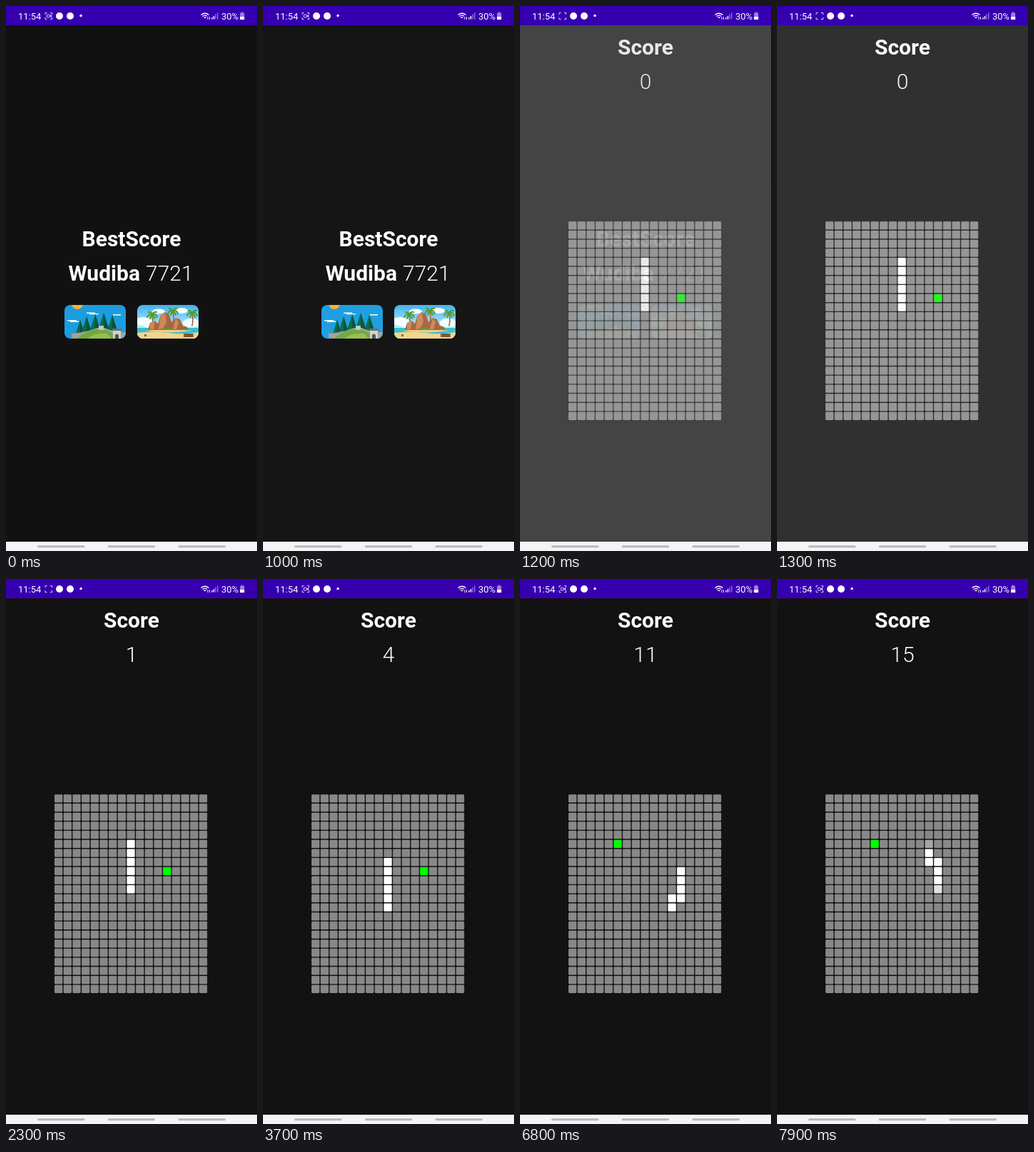
Write an HTML page that moves like this. It is 352 px wide and 762 px high and loops after 8 s.

```html
<!DOCTYPE html>
<html lang="en">
<head>
<meta charset="utf-8">
<title>Snake</title>
<style>
  html, body { margin: 0; width: 100%; height: 100%; overflow: hidden; background: #111; }
  svg { display: block; width: 100vw; height: 100vh; font-family: Roboto, sans-serif; fill: #fff; }
  .big { font-size: 30px; font-weight: 300; }
  .bold { font-weight: 700; }
  .mid { text-anchor: middle; }
  .small { font-size: 13px; }
</style>
</head>
<body>
<svg viewBox="0 0 352 762" preserveAspectRatio="none">
  <defs>
    <clipPath id="card"><rect width="86" height="47" rx="8"/></clipPath>
    <linearGradient id="sky" x2="0" y2="1">
      <stop offset="0" stop-color="#3fb2ee"/><stop offset=".7" stop-color="#c4eefa"/>
    </linearGradient>
    <g id="tree">
      <path d="M0 0L-8 25H8Z" fill="#0b6b4a"/>
      <path d="M0 0L8 25H0Z" fill="#07523c"/>
      <path d="M-1 25h2v3h-2z" fill="#6b4a2c"/>
    </g>
    <g id="palm" fill="none" stroke-linecap="round">
      <path d="M0 0Q2 8 0 17" stroke="#9a6a35" stroke-width="1.6"/>
      <path d="M-7 3Q-4-3 0 0Q4-4 7 3M-5-4Q-1-4 0 0Q2-5 6-4M-3 5Q-2 1 0 0Q3 1 4 5" stroke="#4f9a2c" stroke-width="2"/>
    </g>
  </defs>

  <rect width="352" height="762" fill="#111"/>

  <g id="home">
    <text class="big bold mid" x="176" y="335.5">BestScore</text>
    <text class="big bold" x="188" y="384" text-anchor="end">Wudiba</text>
    <text class="big" x="196" y="384">7721</text>

    <g transform="translate(82 418)" clip-path="url(#card)">
      <rect width="86" height="47" fill="#1b9de0"/>
      <circle cx="18" cy="-2" r="8" fill="#f9b234"/>
      <path d="M4 21h13v1.6H4zM8 22.6h12v1.3H8zM31 10.5h12v1.6H31zM35 12h13v1.3H35zM68 13h11v1.5H68z"/>
      <use href="#tree" x="22" y="21"/>
      <use href="#tree" x="31" y="16"/>
      <use href="#tree" x="67" y="14"/>
      <use href="#tree" x="43" y="13"/>
      <use href="#tree" x="55" y="11"/>
      <path d="M10 47V39h10l14-3 12-4h10l8 3 12 3h10v9z" fill="#9fa39c"/>
      <path d="M18 47Q28 36 46 34Q66 34 74 47Z" fill="#6fa840"/>
      <path d="M32 47Q42 38 60 40L66 47Z" fill="#95bf4c"/>
      <path d="M48 29h7v6h-7z" fill="#c4c6c0"/>
      <path d="M11 38h2v2h-2zm4 0h2v2h-2zm4 0h2v2h-2z" fill="#777b78"/>
      <path d="M68 34h11v13H68z" fill="#d0d1cc"/>
      <path d="M67 33h13v3H67z" fill="#686d6e"/>
      <path d="M71 47v-5q2.500-3 5 0v5z" fill="#4d5358"/>
    </g>

    <g transform="translate(184 418)" clip-path="url(#card)">
      <rect width="86" height="47" fill="url(#sky)"/>
      <g fill="#f4fcff">
        <ellipse cx="9" cy="23" rx="12" ry="6"/><ellipse cx="30" cy="9" rx="9" ry="3.500"/>
        <ellipse cx="62" cy="8" rx="9" ry="4"/><ellipse cx="76" cy="25" rx="12" ry="6"/>
        <ellipse cx="20" cy="28" rx="11" ry="5"/>
      </g>
      <rect y="32" width="86" height="9" fill="#35bfd3"/>
      <path d="M0 39Q20 36 43 39T86 38V47H0Z" fill="#f1d58c"/>
      <path d="M12 36Q43 31 76 36Q43 41 12 36Z" fill="#edcf84"/>
      <use href="#palm" x="21" y="14"/>
      <use href="#palm" x="50" y="9"/>
      <use href="#palm" x="77" y="12"/>
      <path d="M15 35L18 25 25 22 29 26 33 14 39 10 45 14 48 24 54 18 60 20 64 29 70 31 72 35Z" fill="#a8663f"/>
      <path d="M33 14L39 10 41 24 36 33 30 34ZM54 18L58 24 55 34 50 34ZM18 25L25 22 23 34 18 34Z" fill="#c98a5c"/>
      <path d="M35 35Q43 28 50 35Z" fill="#5d9a3a"/>
      <path d="M65 40h14v5H65zM10 41h3v3h-3z" fill="#99623a"/>
      <path d="M67 41h10v1H67zm0 2h10v1H67z" fill="#60402c"/>
    </g>
  </g>

  <g id="game">
    <rect y="27" width="352" height="722" fill="#121212"/>
    <text class="big bold mid" x="176" y="67.500">Score</text>
    <text class="big mid" id="score" x="176" y="116">0</text>
    <g id="grid"></g>
  </g>
  <rect id="veil" y="27" width="352" height="722" fill="#ebebeb"/>

  <rect width="352" height="27" fill="#3600b1"/>
  <text class="small" x="17" y="18.500">11:54</text>
  <path d="M55 12V9.500h2.500M62 9.500h2.500V12M55 16v2.500h2.500M62 18.500h2.500V16" fill="none" stroke="#fff" stroke-opacity=".8"/>
  <g id="cam" fill="none" stroke="#fff" stroke-opacity=".85">
    <rect x="57.300" y="12" width="3.700" height="4" rx=".8"/><path d="M61.500 14l2-1.500v3z"/>
  </g>
  <circle cx="75" cy="14" r="5"/><circle cx="90" cy="14" r="5"/>
  <circle cx="105" cy="13.500" r="1.700"/>
  <g fill="none" stroke="#fff">
    <path d="M273.500 12.500Q279 8 284.500 12.500M275.500 14.500Q279 11.800 282 14.300" stroke-width="1.300"/>
    <path d="M277.500 16.500Q279 15.300 280.500 16.500" stroke-width="1.500"/>
    <path d="M283 15v4M285.500 15v4" stroke-width=".9"/>
    <path d="M289 16v2.500M291.500 14v4.500" stroke-width="1.400"/>
    <path d="M294 11.500v7M296.800 9.500v9" stroke-width="1.400" stroke-opacity=".45"/>
  </g>
  <text class="small" x="302" y="18.500">30%</text>
  <path d="M329.800 8.500h2.800v1.200h1.600v9.300h-6v-9.300h1.600z" fill-opacity=".5"/>
  <path d="M328.200 15h6v4h-6z"/>

  <rect y="749" width="352" height="13" fill="#f4f4f4"/>
  <g fill="#b9b9b9">
    <rect x="44" y="754.300" width="66.500" height="3" rx="1.500"/>
    <rect x="142.700" y="754.300" width="66.500" height="3" rx="1.500"/>
    <rect x="241.400" y="754.300" width="66.500" height="3" rx="1.500"/>
  </g>
</svg>
<script>
const LOOP = 8000, STEP = 100, FADE = 200;
const COLS = 17, ROWS = 22, PITCH = 12.68, SIZE = 11.3, LENGTH = 6;
const GRAY = 136;
const ROUTE = 'DDDRRRURUUUULUU';
const MOVES = [2000, 2600, 3100, 3700, 4400, 4700, 5100, 5700, 6000, 6300, 6600, 6900, 7200, 7600, 7850];
const EATEN = 6600;
const DIRS = { D: [0, 1], U: [0, -1], L: [-1, 0], R: [1, 0] };

// [time, value] pairs, joined by straight lines
const GAME = [[1000, 0], [1100, .11], [1200, .9], [1300, 1]];
const VEIL = [[900, 0], [1000, .015], [1100, .078], [1200, .234], [1300, .14], [1400, .06], [1500, 0]];

const $ = id => document.getElementById(id);
const clamp = v => Math.max(0, Math.min(1, v));

const cells = [];
for (let r = 0; r < ROWS; r++) {
  for (let c = 0; c < COLS; c++) {
    const cell = document.createElementNS('http://www.w3.org/2000/svg', 'rect');
    const attrs = { x: 68 + c * PITCH, y: 301.3 + r * PITCH, width: SIZE, height: SIZE, rx: 1.3 };
    for (const k in attrs) cell.setAttribute(k, attrs[k]);
    $('grid').append(cell);
    cells.push(cell);
  }
}
const index = (c, r) => r * COLS + c;

// every cell the snake visits, tail first
const trail = [];
for (let r = 4; r < 4 + LENGTH; r++) trail.push([8, r]);
for (const d of ROUTE) {
  const [c, r] = trail[trail.length - 1];
  trail.push([c + DIRS[d][0], r + DIRS[d][1]]);
}

function along(keys, t) {
  if (t <= keys[0][0]) return keys[0][1];
  for (let i = 1; i < keys.length; i++) {
    const [t0, a] = keys[i - 1], [t1, b] = keys[i];
    if (t <= t1) return a + (b - a) * (t - t0) / (t1 - t0);
  }
  return keys[keys.length - 1][1];
}

// progress of move number n, counted from 1
function done(n, t) {
  if (n < 1) return 1;
  return n > MOVES.length ? 0 : clamp((t - MOVES[n - 1]) / FADE);
}

function draw(t) {
  $('game').setAttribute('opacity', along(GAME, t));
  $('veil').setAttribute('opacity', along(VEIL, t));
  $('cam').setAttribute('visibility', (t + 800) % 1000 >= 500 ? 'visible' : 'hidden');
  $('score').textContent = MOVES.filter(m => m <= t).length;

  const light = new Array(cells.length).fill(0);
  trail.forEach(([c, r], i) => {
    light[index(c, r)] += done(i - LENGTH + 1, t) - done(i + 1, t);
  });
  const food = t < EATEN ? index(12, 8) : index(5, 5);
  cells.forEach((cell, i) => {
    const g = Math.round(GRAY + (255 - GRAY) * clamp(light[i]));
    cell.setAttribute('fill', i === food ? '#0f0' : `rgb(${g},${g},${g})`);
  });
}

const start = performance.now();
function tick(now) {
  const t = Math.max(0, now - start) % LOOP;
  draw(Math.floor(t / STEP) * STEP);
  requestAnimationFrame(tick);
}
draw(0);
requestAnimationFrame(tick);
</script>
</body>
</html>
```
